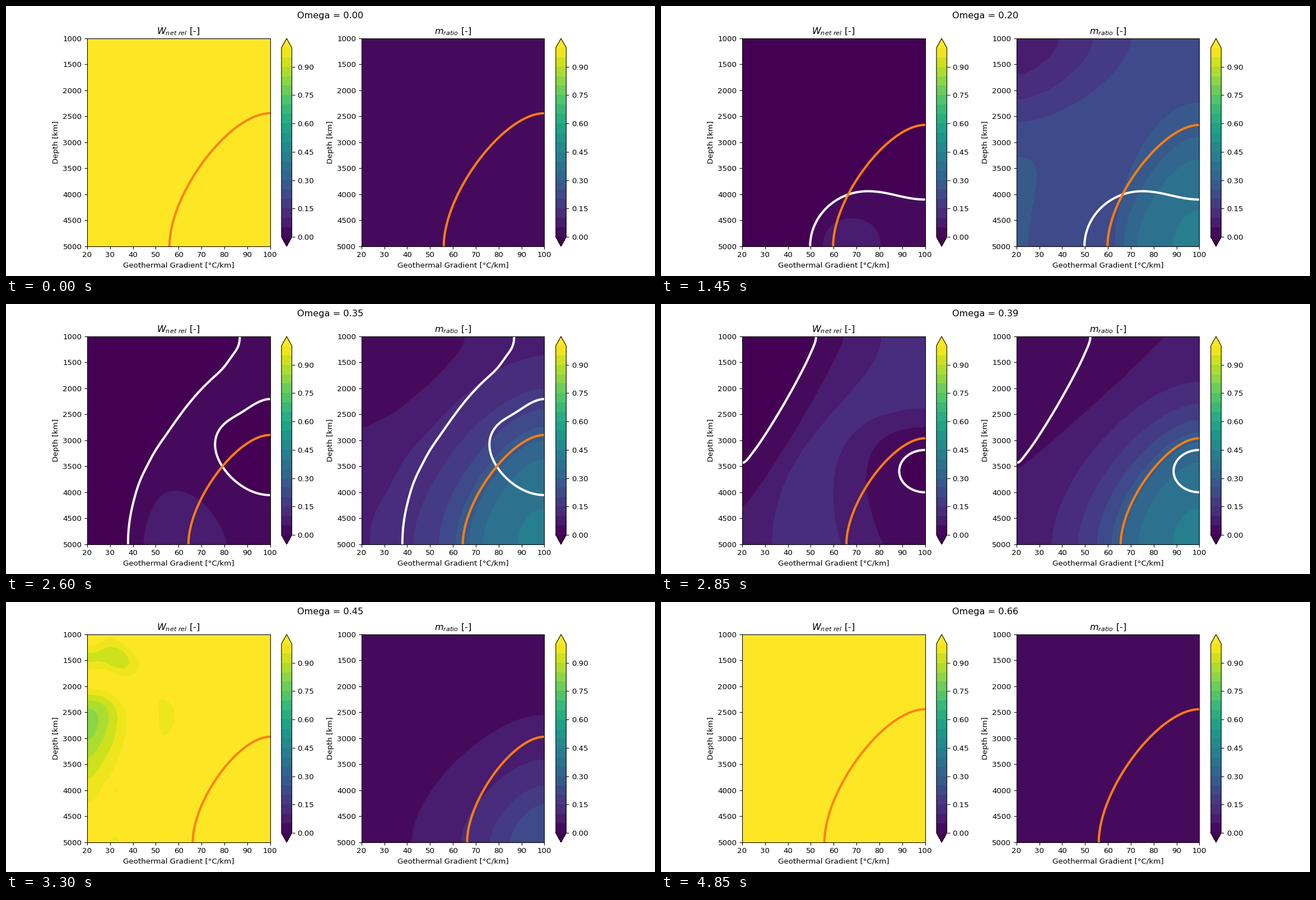
A matplotlib script for the animation above (4950 ms loop, 1159 by 483 pixels).

```python
import numpy as np
import matplotlib.pyplot as plt
from matplotlib.animation import FuncAnimation

WIDTH, HEIGHT = 1159, 483
DPI = WIDTH / 12
FRAMES, INTERVAL = 99, 50
LEFT, RIGHT, TOP, BOTTOM = 20, 100, 1000, 5000
LEVELS = np.linspace(0, 1, 21)
ORDER = 12
ORANGE = "#ff7f0e"

plt.rcParams["font.family"] = "DejaVu Sans"


# Contour shapes

def bezier(*controls, count=16):
    t = np.linspace(0, 1, count)[:, None]
    weights = np.hstack([(1 - t) ** 3, 3 * t * (1 - t) ** 2, 3 * t ** 2 * (1 - t), t ** 3])
    return weights @ np.array(controls, float)


def curve(start, end, bend=0.4, end_bend=None, count=16):
    """Curve that leaves the top or bottom edge upright and any other point level."""
    def handle(point, other, amount):
        axis = 1 if point[1] in (TOP, BOTTOM) else 0
        control = list(point)
        control[axis] += amount * (other[axis] - point[axis])
        return control

    end_bend = bend if end_bend is None else end_bend
    return bezier(start, handle(start, end, bend), handle(end, start, end_bend), end, count=count)


def hot_arc(x, y, bend=0.4, count=16):
    """Arc around the deep, steep-gradient corner."""
    return curve((x, BOTTOM), (RIGHT, y), bend, count=count)


def cool_arc(x, y, bend=0.4):
    """Arc around the shallow, low-gradient corner."""
    return curve((x, TOP), (LEFT, y), bend)


def left_bump(top, bottom, reach, end_reach):
    return bezier((LEFT, top), (LEFT + reach, top), (LEFT + end_reach, bottom), (LEFT, bottom))


def ease(start, end):
    """Cosine step, level at both ends."""
    s = np.linspace(0, 1, 12)
    step = (1 - np.cos(np.pi * s)) / 2
    return np.column_stack([start[0] + (end[0] - start[0]) * s,
                            start[1] + (end[1] - start[1]) * step])


def column(x, first=TOP, count=5):
    return [(x, y) for y in np.linspace(first, BOTTOM, count)]


# Fields are smooth cosine series, flat across every edge of the plot.

def cosines(values, low, high):
    return np.cos(np.pi * np.outer((np.asarray(values) - low) / (high - low), np.arange(ORDER)))


def fit(*samples):
    """Smoothest coefficients through (value, points) samples."""
    points = np.vstack([p for _, p in samples])
    values = np.concatenate([np.full(len(p), v) for v, p in samples])
    by, bx = cosines(points[:, 1], TOP, BOTTOM), cosines(points[:, 0], LEFT, RIGHT)
    basis = (by[:, :, None] * bx[:, None, :]).reshape(len(points), -1)
    squares = np.arange(ORDER) ** 2
    bending = np.add.outer(squares, squares).ravel() ** 2.0
    system = basis.T @ basis + np.diag(1e-5 * bending + 1e-9)
    return np.linalg.solve(system, basis.T @ values).reshape(ORDER, ORDER)


def constant(value):
    coefficients = np.zeros((ORDER, ORDER))
    coefficients[0, 0] = value
    return coefficients


# Net work

def low_work(widen=0):
    return fit(
        (0, curve((50 - widen, BOTTOM), (75, 3940), 0.55)),
        (0, ease((75, 3940), (RIGHT, 4100))),
        (0.05, bezier((55.6 - widen / 2, BOTTOM), (55.6 - widen / 2, 4287), (80.5, 4287),
                      (80.5, BOTTOM))),
        (0.075, [(68, BOTTOM)]),
        (0.02, [(RIGHT, BOTTOM)]),
        (-0.16, [(60, TOP), (RIGHT, TOP), (60, 2200), (RIGHT, 2200)]),
        (-0.35, column(LEFT, count=3)),
    )


def mixed_work():
    angle = np.linspace(-np.pi / 2, np.pi / 2, 16)
    pocket = np.column_stack([RIGHT - 11.3 * np.cos(angle), 3592 + 407 * np.sin(angle)])
    return fit(
        (0, cool_arc(52.4, 3440, 0.13)),
        (0.05, cool_arc(64.6, 4280, 0.1)),
        (0.1, curve((81, TOP), (33.2, BOTTOM), 0.25, 0.52)),
        (0.1, curve((RIGHT, 2387), (63.2, BOTTOM), 1.55, 0)),
        (0.05, curve((RIGHT, 2742), (81.6, BOTTOM), 2.4, 0)),
        (0, pocket),
        (-0.015, [(RIGHT, 3592)]),
        (0.02, [(RIGHT, BOTTOM)]),
        (0.07, [(LEFT, BOTTOM)]),
        (-0.04, [(LEFT, TOP)]),
        (0.12, [(49, BOTTOM), (52, 3800), (70, 2300), (RIGHT, TOP), (RIGHT, 1600)]),
    )


def rising_work():
    dips = [(1 - 0.05 * i, left_bump(2050 + 70 * i + 19 * i ** 2, 4250 - 480 * i + 27 * i ** 2,
                                     36 - 8.5 * i, 6 - i)) for i in range(4)]
    return fit(
        *dips,
        (0.83, [(LEFT, 2735)]),
        (1.03, left_bump(1800, 4800, 60, 12)),
        (1.06, column(60) + column(80) + column(RIGHT) + [(LEFT, TOP), (40, TOP), (40, BOTTOM)]),
    )


# Mass ratio

CORE = [(0.3, hot_arc(67, 2890)), (0.35, hot_arc(73, 3330)), (0.4, hot_arc(88.5, 4310, 0.5)),
        (0.42, [(RIGHT, BOTTOM)])]
RIM = (0.25, hot_arc(63.2, 2235, 0.5))


def rings(levels, x_scale, x_peak, y_scale, y_peak):
    """Hot arcs of a field that decays exponentially away from its corner."""
    return [(level, hot_arc(RIGHT - x_scale * np.log(x_peak / level),
                            BOTTOM - y_scale * np.log(y_peak / level))) for level in levels]


def early_ratio():
    return fit(
        *CORE, RIM,
        (0.25, ease((LEFT, 1720), (41, 1450))),
        (0.25, bezier((41, 1450), (62, 1450), (26.7, 4200), (26.7, BOTTOM))),
        (0.3, left_bump(2500, 3585, 10.7, 10.7)),
        (0.225, column(58) + [(LEFT, TOP), (RIGHT, TOP), (RIGHT, 1600), (47, 4600),
                              (40, BOTTOM)]),
    )


def second_ratio():
    return fit(
        *CORE, RIM,
        (0.1, cool_arc(38.7, 1700)),
        (0.15, cool_arc(53.6, 2180)),
        (0.2, cool_arc(70.2, 2620)),
        (0.25, bezier((LEFT, 3280), (36, 3280), (25, 4100), (25, BOTTOM))),
        (0.27, [(LEFT, 4300)]),
        (0.065, [(LEFT, TOP)]),
        (0.228, column(58, 3000, 3) + column(41, 3300, 3) + [(RIGHT, TOP), (RIGHT, 1600)]),
    )


def third_ratio():
    return fit(
        *CORE,
        (0.05, cool_arc(46.5, 2115, 0.33)),
        (0.1, cool_arc(75, 3415, 0.08)),
        (0.15, hot_arc(28, 1400)),
        (0.2, hot_arc(51, 1950)),
        (0.25, hot_arc(60.5, 2440)),
        (0.02, [(LEFT, TOP)]),
        (0.125, [(RIGHT, TOP), (LEFT, BOTTOM)]),
    )


def fourth_ratio():
    return fit(
        *rings(np.arange(0.1, 0.31, 0.05), 28.5, 0.957, 1060, 1.9),
        (0.05, cool_arc(84.5, 3565, 0.05)),
        (0.35, hot_arc(73.5, 3430)),
        *CORE[2:],
        (0.02, [(LEFT, TOP), (40, 1500)]),
        (0.03, [(LEFT, 2500)]),
        (0.06, [(RIGHT, TOP)]),
    )


def fifth_ratio():
    return fit(
        *rings(np.arange(0.05, 0.21, 0.05), 31.2, 0.32, 1240, 0.36),
        (0.23, [(RIGHT, BOTTOM)]),
        (0.02, [(LEFT, TOP), (60, TOP), (RIGHT, TOP), (LEFT, 3000), (50, 2500)]),
        (0.03, [(RIGHT, 1800), (22, BOTTOM)]),
    )


# Motion: (frame, state) keys with linear change between them

HIGH, LOW, ZERO, EARLY = constant(1.05), low_work(), constant(0.02), early_ratio()
REST = (56, 2440)
WORK = [(0, HIGH), (2, HIGH), (11, LOW), (24, LOW), (45, low_work(1.2)), (57, mixed_work()),
        (66, rising_work()), (77, HIGH), (98, HIGH)]
RATIO = [(0, ZERO), (2, ZERO), (12, EARLY), (17, EARLY), (29, second_ratio()),
         (45, third_ratio()), (57, fourth_ratio()), (66, fifth_ratio()), (80, ZERO), (98, ZERO)]
LIMIT = [(0, REST), (2, REST), (17, (58.6, 2600)), (29, (59.8, 2665)), (45, (62.5, 2810)),
         (57, (65.6, 2960)), (66, (66.2, 2970)), (80, REST), (98, REST)]


def blend(keys, frame):
    for (start, a), (end, b) in zip(keys, keys[1:]):
        if frame <= end:
            part = (frame - start) / (end - start)
            return (1 - part) * np.asarray(a) + part * np.asarray(b)


gradient, depth = np.linspace(LEFT, RIGHT, 101), np.linspace(TOP, BOTTOM, 101)
BASIS_X, BASIS_Y = cosines(gradient, LEFT, RIGHT), cosines(depth, TOP, BOTTOM)


def field(keys, frame):
    return BASIS_Y @ blend(keys, frame) @ BASIS_X.T


# The small surplus keeps the pixel size from rounding down.
fig, axes = plt.subplots(1, 2, figsize=((WIDTH + 1e-3) / DPI, (HEIGHT + 1e-3) / DPI), dpi=DPI,
                         facecolor="white")
heading = fig.suptitle("Omega = 0.00")
drawn = []


def fill(ax, values):
    return ax.contourf(gradient, depth, values, LEVELS, cmap="viridis", extend="both")


def make_panel(ax, title, keys):
    bands = fill(ax, field(keys, 0))
    bar = fig.colorbar(bands, ax=ax, ticks=np.arange(7) * 0.15, format="%.2f")
    bar.minorticks_off()
    drawn.append(bands)
    ax.set(xlim=(LEFT, RIGHT), ylim=(BOTTOM, TOP), xticks=range(20, 101, 10),
           yticks=range(1000, 5001, 500), xlabel="Geothermal Gradient [°C/km]",
           ylabel="Depth [km]")
    ax.set_title(title)
    return ax.plot([], [], color=ORANGE, lw=3, zorder=2.2)[0]


lines = [make_panel(axes[0], r"$W_{net\ rel}$ [-]", WORK),
         make_panel(axes[1], r"$m_{ratio}$ [-]", RATIO)]


def update(frame):
    while drawn:
        drawn.pop().remove()
    heading.set_text(f"Omega = {frame / 148:.2f}")
    work, ratio = field(WORK, frame), field(RATIO, frame)
    limit = hot_arc(*blend(LIMIT, frame), count=100)
    for ax, line, values in zip(axes, lines, (work, ratio)):
        drawn.append(fill(ax, values))
        if work.min() < 0 < work.max():
            drawn.append(ax.contour(gradient, depth, work, [0], colors="white", linewidths=3))
        line.set_data(*limit.T)
    return []


animation = FuncAnimation(fig, update, frames=FRAMES, interval=INTERVAL, repeat=True,
                          init_func=lambda: [])
plt.show()
```
